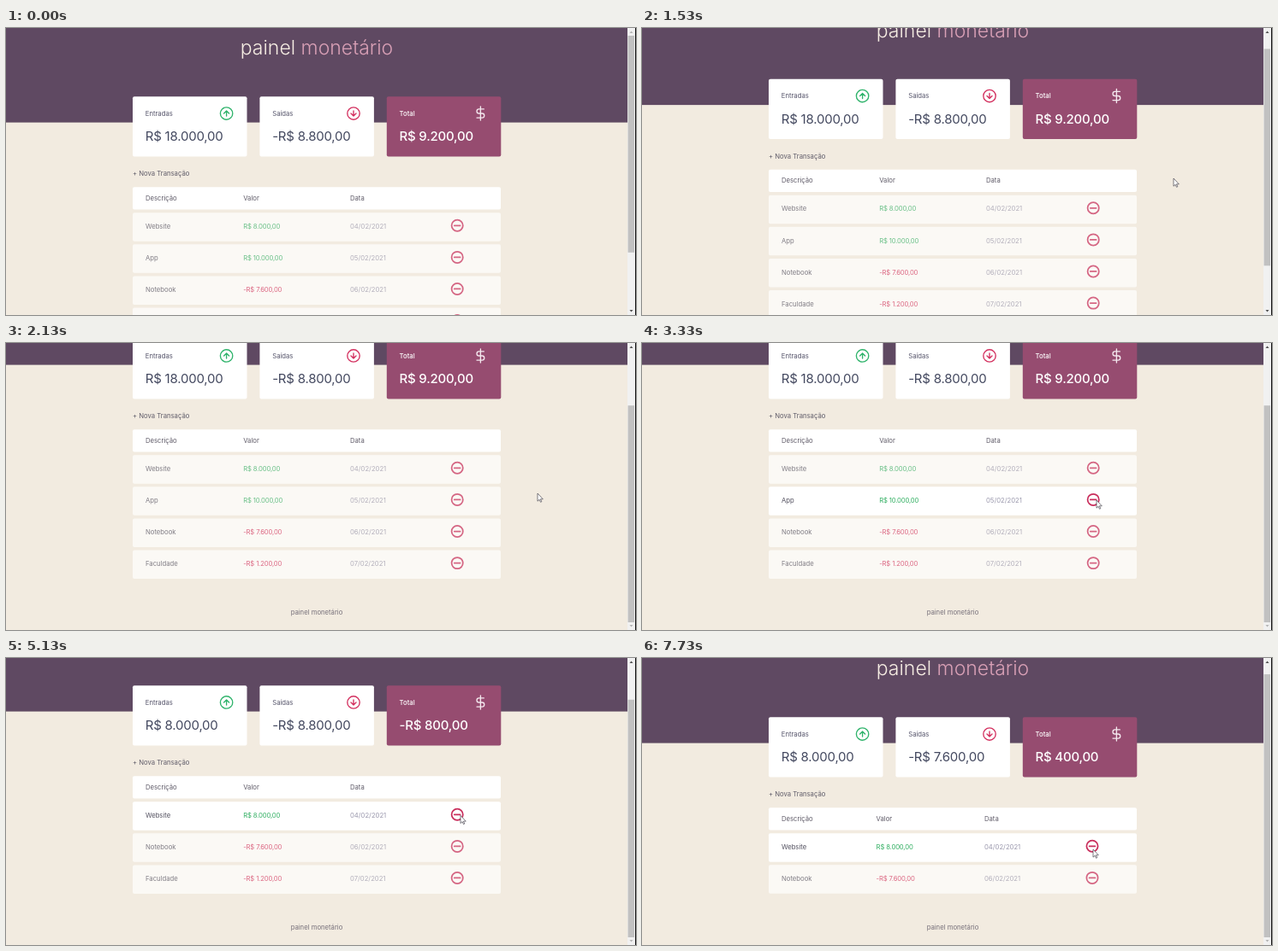
Animation of 736x336 px, one loop 8000 ms. Source, as an HTML page:

```html
<!DOCTYPE html>
<html lang="pt-BR">
<head>
<meta charset="utf-8">
<title>painel monetário</title>
<style>
  html, body { margin: 0; width: 100%; height: 100%; overflow: hidden; background: #f2ebe0; }
  svg { display: block; width: 736px; height: 336px; }
  text { font: 400 7.7px Inter, "Open Sans", sans-serif; fill: #5f5b68; white-space: pre; }
  .title { font-size: 23px; font-weight: 300; fill: #f6ede3; text-anchor: middle; }
  .title tspan { fill: #d9a0b6; }
  .sum { font-size: 15px; letter-spacing: -.015em; fill: #43485f; }
  .label { fill: #55546a; }
  .white { fill: #fff; font-weight: 500; }
  .name { fill: #52505f; }
  .in, .out { letter-spacing: -.02em; fill: #2fae60; }
  .out { fill: #d3305a; }
  .date { fill: #9896ab; }
  .foot { text-anchor: middle; fill: #77707a; }
  .icon { fill: none; stroke-width: 1.35; stroke-linecap: round; stroke-linejoin: round; }
</style>
</head>
<body>
<svg viewBox="0 0 736 336">
  <rect width="736" height="336" fill="#f2ebe0"/>
  <g id="page">
    <rect width="726" height="110.6" fill="#5f4962"/>
    <text class="title" x="363" y="31">painel <tspan>monetário</tspan></text>
    <g id="cards"></g>
    <text x="148" y="173">+ Nova Transação</text>
    <rect x="148" y="186.2" width="430" height="26.3" rx="2" fill="#fff"/>
    <text x="163" y="201.5">Descrição</text>
    <text id="headValue" y="201.5">Valor</text>
    <text id="headDate" y="201.5">Data</text>
    <g id="rows"></g>
    <text id="foot" class="foot" x="363">painel monetário</text>
  </g>
  <rect x="726" width="10" height="336" fill="#f1f1f1"/>
  <rect id="thumb" x="726.6" width="7.4" fill="#c1c1c1"/>
  <path id="up" d="M728.5 6l2-2.5 2 2.5z"/>
  <path id="down" d="M728.5 330l2 2.5 2-2.5z"/>
  <rect x="735" width="1" height="336" fill="#111"/>
  <path id="cursor" d="M0 0V9.2L2.1 7.3 3.5 10.3 4.8 9.7 3.4 6.8H6.3Z"
        fill="#fff" stroke="#45424c" stroke-width=".7"/>
</svg>
<script>
const LOOP = 8000, TICK = 1000 / 15, STEP = 37.1, ROW_TOP = 216.2, ROW_H = 33.5;
const $ = id => document.getElementById(id);

function add(parent, tag, attrs, text) {
  const el = document.createElementNS('http://www.w3.org/2000/svg', tag);
  for (const key in attrs) el.setAttribute(key, attrs[key]);
  if (text) el.textContent = text;
  return parent.appendChild(el);
}

function addCard(x, label, color, fill, tone, icon) {
  const g = add($('cards'), 'g', { transform: `translate(${x} 80.2)` });
  add(g, 'rect', { width: 133.5, height: 70.2, rx: 2, fill });
  add(g, 'text', { x: 14.8, y: 22.5, class: 'label ' + tone }, label);
  add(g, 'path', { d: icon, class: 'icon', stroke: color, transform: 'translate(109.6 19.8)' });
  return add(g, 'text', { x: 14.8, y: 52.2, class: 'sum ' + tone });
}

const ring = 'M-7.2 0a7.2 7.2 0 1 0 14.4 0a7.2 7.2 0 1 0-14.4 0';
const dollar = 'M0-8V8M3.9-5.1H-1.8a2.5 2.5 0 0 0 0 5.1H1.8a2.5 2.5 0 0 1 0 5.1H-4.4';
const sums = [
  addCard(148, 'Entradas', '#2fb36b', '#fff', '', ring + 'M0 3V-3M-3 0L0-3 3 0'),
  addCard(296.4, 'Saídas', '#d3305f', '#fff', '', ring + 'M0-3V3M-3 0L0 3 3 0'),
  addCard(444.8, 'Total', '#f4e8ee', '#964c70', 'white', dollar)
];

const rows = [
  ['Website', 8000, '04/02/2021', Infinity],
  ['App', 10000, '05/02/2021', 3930],
  ['Notebook', -7600, '06/02/2021', Infinity],
  ['Faculdade', -1200, '07/02/2021', 6400]
].map(([name, value, date, end]) => {
  const g = add($('rows'), 'g', {});
  add(g, 'rect', { x: 148, width: 430, height: ROW_H, rx: 2, fill: '#fff' });
  add(g, 'text', { x: 163, y: 18.8, class: 'name' }, name);
  const valueEl = add(g, 'text', { y: 18.8, class: value < 0 ? 'out' : 'in' }, money(value));
  const dateEl = add(g, 'text', { y: 18.8, class: 'date' }, date);
  const icon = add(g, 'path', {
    d: 'M-6.6 0a6.6 6.6 0 1 0 13.2 0a6.6 6.6 0 1 0-13.2 0M-3.4 0H3.4',
    class: 'icon', stroke: '#c92e5c', style: 'stroke-width:1.75'
  });
  return { g, value, end, valueEl, dateEl, icon };
});

function money(n) {
  const whole = String(Math.abs(n)).replace(/\B(?=(\d{3})+$)/g, '.');
  return (n < 0 ? '-' : '') + 'R$ ' + whole + ',00';
}

// [start, end, x, y]: glide to a point
const moves = [
  [480, 800, 621, 176],
  [2800, 3330, 531, 184],
  [5100, 5930, 527, 257],
  [7270, 7730, 527, 224]
];
const wheel = [4, 20.5, 50, 74, 83, 85];

const ease = p => p * p * (3 - 2 * p);

function cursorAt(t) {
  let x = 600, y = 188;
  for (const [start, end, toX, toY] of moves) {
    const p = ease(Math.min(1, Math.max(0, (t - start) / (end - start))));
    x += (toX - x) * p;
    y += (toY - y) * p;
  }
  return [x, y];
}

function drawScrollbar(scroll, height) {
  const ratio = 318 / height;
  const arrow = enabled => enabled ? '#505050' : '#b4b4b4';
  $('thumb').setAttribute('y', 9 + scroll * ratio);
  $('thumb').setAttribute('height', 336 * ratio);
  $('up').setAttribute('fill', arrow(scroll > 0));
  $('down').setAttribute('fill', arrow(scroll < height - 336));
}

function draw(time) {
  const tick = Math.floor((time + 7) / TICK), t = tick * TICK;
  const live = rows.filter(r => t < r.end);
  const gone = rows.length - live.length;
  const height = 421 - 37 * gone;
  const wheeled = tick < 22 ? 0 : wheel[Math.min(tick - 22, 5)];
  const scroll = Math.min(wheeled, height - 336);
  const [cx, cy] = cursorAt(t);
  const narrow = gone > 1;
  const valueX = narrow ? 273.6 : 277.2, dateX = narrow ? 400 : 402;

  $('page').setAttribute('transform', `translate(0 ${-scroll})`);
  $('headValue').setAttribute('x', valueX);
  $('headDate').setAttribute('x', dateX);
  $('foot').setAttribute('y', 402.7 - 37 * gone);

  for (const r of rows) {
    const i = live.indexOf(r);
    r.g.style.display = i < 0 ? 'none' : '';
    const top = ROW_TOP + STEP * i, dy = cy + scroll - top;
    const hover = t >= 530 && cx > 148 && cx < 578 && dy >= 0 && dy < ROW_H;
    r.g.setAttribute('transform', `translate(0 ${top})`);
    r.g.setAttribute('opacity', hover ? 1 : .7);
    r.valueEl.setAttribute('x', valueX);
    r.dateEl.setAttribute('x', dateX);
    r.icon.setAttribute('transform', `translate(${narrow ? 526 : 527.2} 15.1)`);
  }

  const total = pick => live.reduce((sum, r) => sum + (pick(r.value) ? r.value : 0), 0);
  [v => v > 0, v => v < 0, () => true].forEach((pick, i) => {
    sums[i].textContent = money(total(pick));
  });

  drawScrollbar(scroll, height);
  $('cursor').setAttribute('transform', `translate(${cx} ${cy})`);
  $('cursor').style.display = t < 530 ? 'none' : '';
}

const begin = performance.now();
function frame() {
  draw((performance.now() - begin) % LOOP);
  requestAnimationFrame(frame);
}
frame();
</script>
</body>
</html>
```
